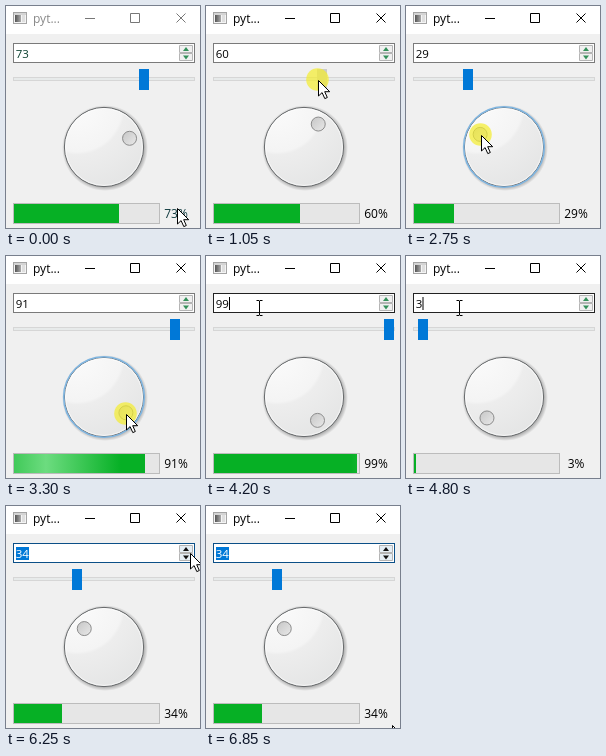
Write an HTML page that moves like this. It is 194 px wide and 222 px high and loops after 6.9 s.

```html
<!DOCTYPE html>
<html lang="en">
<head>
<meta charset="utf-8">
<title>Linked widgets</title>
<style>
  html, body { margin: 0; width: 100%; height: 100%; overflow: hidden; background: #f0f0f0; }
  svg { display: block; width: 194px; height: 222px; }
  text { font: 12px "Open Sans", "Noto Sans", sans-serif; }
  #number { font-size: 11.5px; }
</style>
</head>
<body>
<svg viewBox="0 0 194 222">
  <defs>
    <radialGradient id="face" gradientUnits="userSpaceOnUse" cx="71" cy="101" r="104">
      <stop offset="0" stop-color="#fbfbfb"/>
      <stop offset="0.43" stop-color="#f4f4f4"/>
      <stop offset="0.46" stop-color="#ededed"/>
      <stop offset="1" stop-color="#e1e2e2"/>
    </radialGradient>
    <linearGradient id="knobFill" x1="0" y1="0" x2="1" y2="1">
      <stop offset="0" stop-color="#c6c6c6"/>
      <stop offset="1" stop-color="#e9e9e9"/>
    </linearGradient>
    <radialGradient id="shade">
      <stop offset="0.91" stop-opacity="0.25"/>
      <stop offset="1" stop-opacity="0"/>
    </radialGradient>
    <linearGradient id="shine">
      <stop offset="0" stop-color="#86e796" stop-opacity="0"/>
      <stop offset="0.5" stop-color="#86e796" stop-opacity="0.8"/>
      <stop offset="1" stop-color="#86e796" stop-opacity="0"/>
    </linearGradient>
    <linearGradient id="pane">
      <stop offset="0" stop-color="#555"/>
      <stop offset="1" stop-color="#aaa"/>
    </linearGradient>
    <clipPath id="barClip"><rect id="clipRect" x="8" y="198" height="19"/></clipPath>
  </defs>

  <rect width="194" height="222" fill="#f0f0f0"/>
  <rect width="194" height="28" fill="#fff"/>
  <rect x="7.5" y="6.5" width="13" height="11" fill="#f4f4f4" stroke="#a4a4a4"/>
  <path d="M8 8h12" stroke="#b4b4b4"/>
  <rect x="9" y="9" width="6" height="7" fill="url(#pane)"/>
  <rect x="16" y="9" width="3" height="7" fill="#dedede"/>
  <text id="title" x="27" y="17">pyt...</text>
  <path id="controls" d="M79 12.5h10M124.5 7.5h9v9h-9zM170.5 7.5l9 9M179.5 7.5l-9 9" fill="none"/>

  <rect id="spin" x="7.5" y="37.5" width="181" height="19" fill="#fff"/>
  <rect id="select" x="10" y="41" width="13" height="13" fill="#0078d7"/>
  <text id="number" x="9.8" y="52"></text>
  <path id="caret" d="M10.5 41v13" stroke="#000"/>
  <path id="buttons" d="M173.5 39.5h13v7h-13zM173.5 47.5h13v7h-13z" stroke="#b4b4b4"/>
  <path id="arrows" d="M177 45l3-4 3 4zM177 49.5l3 4 3-4z"/>

  <rect x="7.5" y="71.5" width="181" height="3" fill="#e7eaea" stroke="#d6d6d6"/>
  <rect id="handle" y="63" width="10" height="21"/>

  <circle cx="99" cy="142" r="43" fill="url(#shade)"/>
  <circle cx="98" cy="141" r="39.6" fill="url(#face)" stroke="#65686a"/>
  <circle cx="98" cy="141" r="38.4" fill="none" stroke="#fff" opacity="0.6"/>
  <circle id="ring" cx="98" cy="141" r="40.3" fill="none" stroke="#7fb6e2" stroke-width="1.6"/>
  <circle id="knob" r="7" fill="url(#knobFill)" stroke="#8c8c8c"/>

  <rect x="7.5" y="197.5" width="146" height="20" fill="#e6e6e6" stroke="#bcbcbc"/>
  <g clip-path="url(#barClip)">
    <rect x="8" y="198" width="145" height="19" fill="#06b025"/>
    <rect id="glow" y="198" width="150" height="19" fill="url(#shine)"/>
  </g>
  <text id="percent" x="170" y="212" text-anchor="middle"></text>

  <circle id="halo" cx="-0.5" cy="-0.5" r="11.3" fill="#f4ec2c" opacity="0.7"/>
  <path id="arrow" d="M.5.5v15.5l3.6-3.4 2.7 6 2.5-1.1-2.6-5.8h5z" fill="#fff" stroke="#000"/>
  <path id="beam" d="M-2.5-7.5h2.5l.5.5.5-.5h2.5M.5-7v14M-2.5 7.5h2.5l.5-.5.5.5h2.5" fill="none" stroke="#000"/>
</svg>
<script>
const LOOP = 6900, STEP = 50;
const ui = {};
document.querySelectorAll('[id]').forEach(e => ui[e.id] = e);

// Start and end of each act
const SLIDE = [820, 1660], TURN = [2350, 3510], EDIT = [3900, 5300], CLICK = [5300, 5500];
const TYPED = [9, 3, 30];

const set = (e, attrs) => { for (const k in attrs) e.setAttribute(k, attrs[k]); };
const show = (e, on) => set(e, { visibility: on ? 'visible' : 'hidden' });
const within = (t, [a, b]) => t >= a && t < b;
const clamp = (x, lo, hi) => Math.min(hi, Math.max(lo, x));
const mix = (a, b, p) => a + (b - a) * p;

function ease(t, [a, b]) {
  const p = clamp((t - a) / (b - a), 0, 1);
  return p * p * (3 - 2 * p);
}

function valueAt(t) {
  if (t < TURN[0]) return Math.round(mix(73, 3, ease(t, SLIDE)));
  if (t < 4400) return Math.round(mix(3, 99, ease(t, TURN)));
  if (t < CLICK[0]) return TYPED[Math.min(2, Math.floor((t - 4400) / 250))];
  return 30 + clamp(Math.floor((t - CLICK[0]) / STEP) + 1, 0, 4);
}

const handleAt = v => 7 + 171 * v / 99;

function knobAt(v) {
  const a = (240 - 300 * v / 99) * Math.PI / 180;
  return [98 + 27 * Math.cos(a), 141 - 27 * Math.sin(a)];
}

// Glides from stop to stop; the first two follow the part being dragged
function pointerAt(t, v) {
  const [kx, ky] = knobAt(v);
  const stops = [
    [[100, 650], handleAt(v) + 2, mix(73, 78, ease(t, SLIDE))],
    [[2000, TURN[0]], kx + 1, ky + 1],
    [[TURN[1], EDIT[0]], 53, 52],
    [[5100, CLICK[0]], 179, 44],
    [[5450, 5550], 184, 47],
    [[6500, 6850], 186, 219]
  ];
  let x = 171, y = 202;
  for (const [time, tx, ty] of stops) {
    const p = ease(t, time);
    x = mix(x, tx, p);
    y = mix(y, ty, p);
  }
  return [Math.floor(x), Math.round(y)];
}

function draw(t) {
  const v = valueAt(t), [kx, ky] = knobAt(v), [px, py] = pointerAt(t, v);
  const active = t >= 750, editing = within(t, EDIT), picked = t >= EDIT[1];
  const held = within(t, [750, 2050]), turning = within(t, TURN);

  set(ui.title, { fill: active ? '#000' : '#888' });
  set(ui.controls, { stroke: active ? '#000' : '#777' });

  set(ui.spin, { stroke: picked ? '#0b4f87' : editing ? '#222' : '#7a7a7a' });
  ui.number.textContent = v;
  set(ui.number, { fill: picked ? '#fff' : active ? '#000' : '#0b4030' });
  show(ui.select, picked);
  show(ui.caret, editing);
  set(ui.caret, { transform: `translate(${6.5 * String(v).length} 0)` });
  set(ui.buttons, { fill: picked ? '#e5eef5' : '#f0f0f0' });
  set(ui.arrows, { fill: picked ? '#111' : '#34905a' });

  set(ui.handle, { x: Math.round(handleAt(v)), fill: held ? '#ccc' : '#0078d7' });
  show(ui.ring, within(t, [TURN[0], EDIT[0]]));
  set(ui.knob, { cx: kx, cy: ky });

  set(ui.clipRect, { width: Math.max(0, Math.round(1.46 * v - 2)) });
  const sweep = t < 5130 ? t - 2830 : t - 5130;
  set(ui.glow, { x: sweep < 0 ? -200 : 0.2 * sweep - 129 });
  ui.percent.textContent = v + '%';
  set(ui.percent, { fill: active ? '#000' : '#123c40' });

  const overText = within(px, [8, 173]) && within(py, [37, 57]);
  show(ui.halo, held || turning || within(t, CLICK));
  show(ui.arrow, !overText);
  show(ui.beam, overText);
  for (const e of [ui.halo, ui.arrow, ui.beam]) set(e, { transform: `translate(${px} ${py})` });
}

const begin = performance.now();
function tick() {
  const t = (performance.now() - begin) % LOOP;
  draw(Math.floor(t / STEP) * STEP);
  requestAnimationFrame(tick);
}
tick();
</script>
</body>
</html>
```
